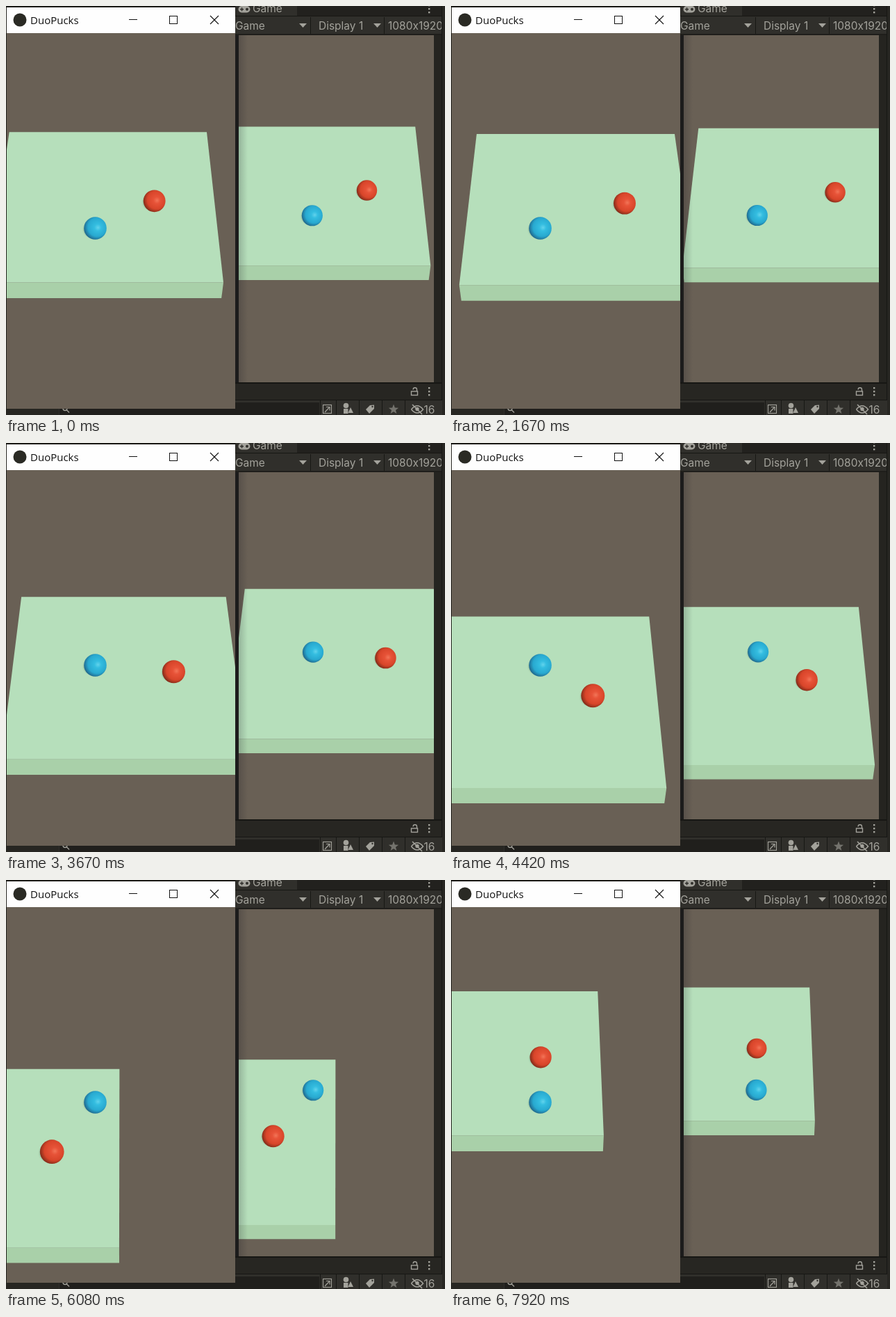
An HTML page with a canvas that plays this animation: 632 px wide and 588 px high, repeating every 8 s.

```html
<!DOCTYPE html>
<html lang="en">
<head>
<meta charset="utf-8">
<title>Two balls on a table</title>
<style>
html, body { margin: 0; width: 100%; height: 100%; overflow: hidden; background: #272622; }
canvas { display: block; }
</style>
</head>
<body>
<canvas id="stage" width="632" height="588"></canvas>
<script>
const ctx = document.getElementById('stage').getContext('2d');
const LOOP = 8000, HOLD = 500, STEP = 250 / 3, LAG = 18;
const INK = '#a3a29b', EDGE = '#171714', BASE = '#272622', BAR = '#302f2b', VIEW = '#696055';

// Camera pitched 45 degrees; lengths are in pixels at the view centre.
const FOCAL = 1240, SIDE = 317, DEPTH = 225, DROP = 23;
const BALL = 16, LIFT = 11.2;

// time, right edge of the table, depth of its far edge
const PATH = [
  [417, 137.7, 142.4], [1250, 162, 142.5], [1670, 174.1, 139],
  [2080, 186, 131], [2920, 189.7, 115.3], [3750, 159, 91.6],
  [4420, 125.6, 62.4], [4580, 117.5, 53.8], [5420, 55.8, 23.2],
  [5600, 40, 21.5], [6080, -2, 38.1], [6250, -8.4, 51],
  [6700, -20.5, 88], [7080, -16.8, 120.5], [7170, -13.2, 128],
  [7920, 52.3, 169.4]
];
const LAST = PATH.length - 1;

function secant(i, c) {
  return (PATH[i + 1][c] - PATH[i][c]) / (PATH[i + 1][0] - PATH[i][0]);
}

function tangent(i, c) {
  if (i === 0) return 1.5 * secant(0, c) - 0.5 * tangent(1, c);
  if (i === LAST) return 1.5 * secant(i - 1, c) - 0.5 * tangent(i - 1, c);
  const before = PATH[i][0] - PATH[i - 1][0];
  const after = PATH[i + 1][0] - PATH[i][0];
  return (secant(i - 1, c) * after + secant(i, c) * before) / (before + after);
}

function along(t, c) {
  let i = 0;
  while (i < LAST - 1 && t > PATH[i + 1][0]) i++;
  const h = PATH[i + 1][0] - PATH[i][0];
  const s = (t - PATH[i][0]) / h, r = 1 - s;
  return PATH[i][c] * (1 + 2 * s) * r * r + PATH[i + 1][c] * s * s * (3 - 2 * s)
    + h * s * r * (tangent(i, c) * r - tangent(i + 1, c) * s);
}

const pose = t => ({ right: along(t, 1), far: along(t, 2) });

function project(x, z, drop = 0) {
  const k = FOCAL / (FOCAL + z + drop);
  return { x: x * k, y: (drop - z) * k, k };
}

function rect(x, y, w, h, color) {
  ctx.fillStyle = color;
  ctx.fillRect(x, y, w, h);
}

function poly(points, color) {
  ctx.beginPath();
  points.forEach(p => ctx.lineTo(p.x, p.y));
  ctx.closePath();
  ctx.fillStyle = color;
  ctx.fill();
}

function disc(x, y, r, color) {
  ctx.beginPath();
  ctx.arc(x, y, r, 0, Math.PI * 2);
  ctx.fillStyle = color;
  ctx.fill();
}

function line(points, color, width = 1) {
  ctx.beginPath();
  points.forEach(([x, y]) => ctx.lineTo(x, y));
  ctx.strokeStyle = color;
  ctx.lineWidth = width;
  ctx.stroke();
}

function text(str, x, y, font, color) {
  ctx.font = font;
  ctx.fillStyle = color;
  ctx.fillText(str, x, y);
}

function ball(x, y, r, colors) {
  const sx = x - r * 0.35, sy = y + r * 0.1, sr = r * 0.8;
  const shade = ctx.createRadialGradient(sx, sy, r * 0.4, sx, sy, sr);
  shade.addColorStop(0, 'rgba(70,110,85,.5)');
  shade.addColorStop(1, 'rgba(70,110,85,0)');
  disc(sx, sy, sr, shade);
  const g = ctx.createRadialGradient(x + r * 0.25, y - r * 0.05, 0, x + r * 0.15, y - r * 0.12, r * 1.2);
  colors.forEach((c, i) => g.addColorStop([0, 0.25, 0.68, 1][i], c));
  disc(x, y, r, g);
}

const RED = ['#f27558', '#e75338', '#d8452a', '#7c2a18'];
const BLUE = ['#62d3ec', '#34bde0', '#28a9d0', '#1f6388'];

function scene(x, y, w, h, t, lag) {
  const now = pose(t), cam = pose(t - lag);
  const { right, far } = cam, left = right - SIDE, near = far - DEPTH;
  ctx.save();
  ctx.beginPath();
  ctx.rect(x, y, w, h);
  ctx.clip();
  rect(x, y, w, h, VIEW);
  ctx.translate(x + w / 2, y + h / 2);
  ctx.scale(h / 540, h / 540);
  const nearLeft = project(left, near), nearRight = project(right, near);
  poly([nearLeft, nearRight, project(right, near, DROP), project(left, near, DROP)], '#a9d0a9');
  poly([project(left, far), project(right, far), nearRight, nearLeft], '#b6dfbb');
  const fixed = project(right - 89.3, far - 124.8, -LIFT);
  ball(fixed.x, fixed.y, BALL * fixed.k, RED);
  ball(-37 + cam.right - now.right, 10.5 + now.far - cam.far, 16.3, BLUE);
  ctx.restore();
}

function kebab(x, y) {
  for (const dy of [-5, 0, 5]) rect(x - 1, y + dy - 1, 2.4, 2.4, INK);
}

function arrow(x, y) {
  poly([{ x, y }, { x: x + 11, y }, { x: x + 5.5, y: y + 6 }], INK);
}

function gamepad() {
  ctx.beginPath();
  ctx.roundRect(334.5, 0, 17, 9.5, 4.7);
  ctx.fillStyle = INK;
  ctx.fill();
  rect(337, 4, 5, 1.5, BAR);
  rect(338.8, 2.3, 1.5, 5, BAR);
  disc(347, 4.7, 2, BAR);
}

function lock() {
  ctx.strokeStyle = INK;
  ctx.lineWidth = 1.4;
  ctx.strokeRect(583.5, 554, 9, 5.5);
  ctx.beginPath();
  ctx.arc(588.8, 551.5, 2.7, Math.PI, 0);
  ctx.lineTo(591.5, 554);
  ctx.stroke();
}

function star(x, y, r) {
  const points = Array.from({ length: 10 }, (_, i) => {
    const a = i * Math.PI / 5 - Math.PI / 2, d = i % 2 ? r * 0.42 : r;
    return { x: x + d * Math.cos(a), y: y + d * Math.sin(a) };
  });
  poly(points, '#74736d');
}

function bottomBar() {
  rect(76, 567, 552, 21, BAR);
  rect(77, 570, 374, 18, '#201f1c');
  for (const x of [452, 475, 508, 541, 574]) rect(x, 567, 1, 21, EDGE);
  ctx.strokeStyle = INK;
  ctx.lineWidth = 1.3;
  ctx.beginPath();
  ctx.arc(85, 578.5, 3, 0, Math.PI * 2);
  ctx.stroke();
  line([[87, 580.5], [91, 584.5]], INK, 1.5);

  ctx.lineWidth = 1.1;
  ctx.strokeStyle = INK;
  ctx.strokeRect(456.5, 573.5, 12, 12);
  line([[459, 584], [465.5, 577]], INK, 1.2);
  line([[461, 576.5], [466, 576.5], [466, 581.5]], INK, 1.2);

  disc(489.5, 574.5, 3.8, INK);
  rect(486, 579, 6.5, 7, INK);
  poly([{ x: 496, y: 577 }, { x: 500, y: 585 }, { x: 492.5, y: 585 }], INK);

  poly([{ x: 518, y: 580 }, { x: 524, y: 574 }, { x: 530, y: 573.5 },
    { x: 530, y: 579 }, { x: 523, y: 586 }], INK);
  disc(527.5, 576, 1.2, BAR);

  star(558, 580, 7.5);

  ctx.beginPath();
  ctx.moveTo(583.5, 580);
  ctx.quadraticCurveTo(592, 569.5, 600.5, 580);
  ctx.quadraticCurveTo(592, 590, 583.5, 580);
  ctx.strokeStyle = INK;
  ctx.lineWidth = 1.6;
  ctx.stroke();
  disc(592, 579.5, 2.7, INK);
  line([[585, 573], [599, 587]], INK, 1.6);
  text('16', 601.5, 586, '15.5px Inter, sans-serif', INK);
}

function editor() {
  const font = '15.5px Inter, sans-serif';
  rect(0, 0, 632, 588, BASE);
  rect(330, 0, 298, 14, '#22211e');
  rect(331, 0, 88, 14, BAR);
  rect(330, 14, 298, 27, BAR);
  rect(330, 14, 298, 1, EDGE);
  rect(330, 40, 298, 503, '#1f1e1b');
  rect(616, 42, 11, 499, '#252420');
  rect(330, 541, 298, 2, EDGE);
  rect(330, 543, 298, 23, BASE);
  rect(330, 566, 298, 1, EDGE);
  rect(627, 0, 1, 588, EDGE);
  gamepad();
  text('Game', 355, 9, font, INK);
  kebab(609, 4);
  ctx.save();
  ctx.beginPath();
  ctx.rect(330, 15, 297, 25);
  ctx.clip();
  text('Game', 330, 34, font, INK);
  text('Display 1', 450, 34, font, INK);
  text('1080x1920', 550, 34, font, INK);
  ctx.restore();
  arrow(422, 25);
  arrow(529, 25);
  rect(438, 16, 1, 24, EDGE);
  rect(544, 16, 1, 24, EDGE);
  lock();
  kebab(609, 554);
  bottomBar();
}

function gameWindow() {
  rect(0, 0, 330, 2, '#1c1b18');
  rect(1, 2, 329, 37, '#fefefe');
  disc(20, 20, 9.5, '#2a2a24');
  text('DuoPucks', 35, 26, '15px "Open Sans", sans-serif', '#111');
  rect(177, 19, 12, 1, '#111');
  ctx.strokeStyle = '#111';
  ctx.lineWidth = 1;
  ctx.strokeRect(235.5, 14.5, 11, 11);
  line([[294, 14], [306, 26]], '#111', 1.1);
  line([[306, 14], [294, 26]], '#111', 1.1);
}

function castShadow() {
  const g = ctx.createLinearGradient(330, 0, 348, 0);
  g.addColorStop(0, 'rgba(20,20,30,.28)');
  g.addColorStop(1, 'rgba(20,20,30,0)');
  rect(330, 42, 18, 499, g);
}

function draw(ms) {
  const step = Math.max(-1, Math.floor((ms % LOOP - HOLD + 4) / STEP));
  const t = HOLD + Math.min(step, 89) * STEP;
  editor();
  scene(335, 42, 281, 499, t, LAG);
  castShadow();
  gameWindow();
  scene(1, 39, 329, 540, t, 0);
}

const start = performance.now();
function tick() {
  draw(performance.now() - start);
  requestAnimationFrame(tick);
}
tick();
</script>
</body>
</html>
```
